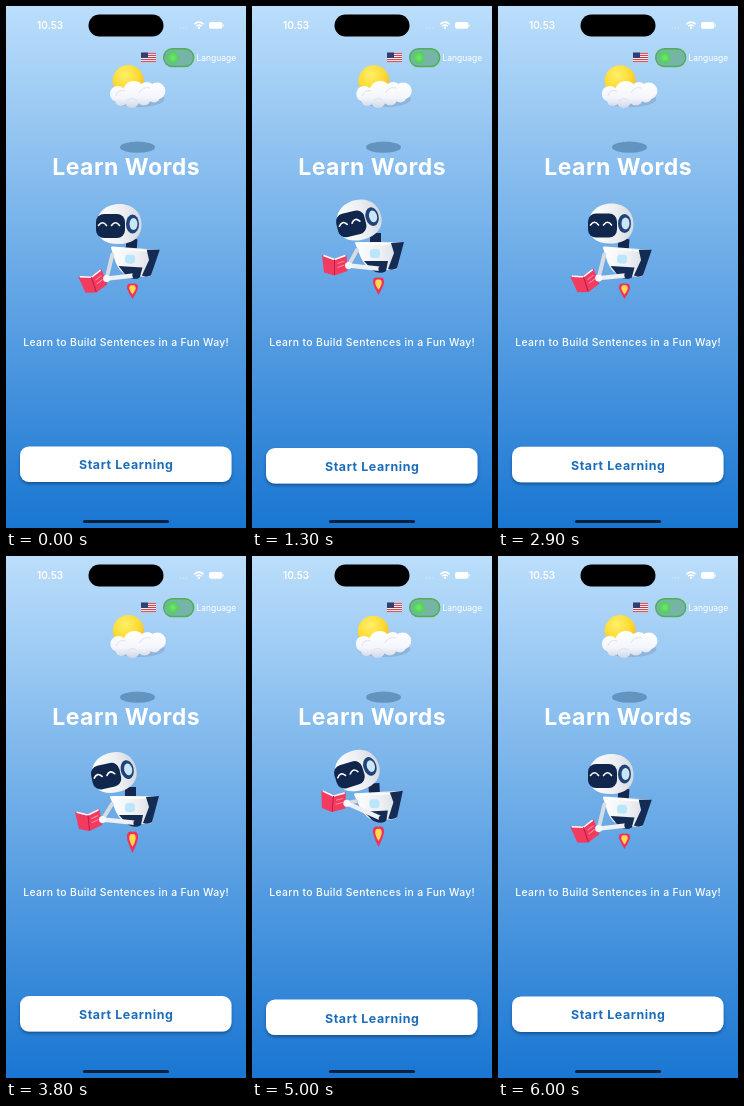
These frames come from a looping animation (240x522 px, 6100 ms). An HTML page:

```html
<!DOCTYPE html>
<html lang="en">
<head>
<meta charset="utf-8">
<title>Learn Words</title>
<style>
  html, body { margin: 0; width: 100%; height: 100%; overflow: hidden; }
  svg { display: block; width: 240px; height: 522px; font-family: Inter, "Open Sans", sans-serif; }
  .mid { text-anchor: middle; }
</style>
</head>
<body>
<svg viewBox="0 0 240 522">
  <defs>
    <linearGradient id="sky" x2="0" y2="1">
      <stop stop-color="#bbdefb"/><stop offset="1" stop-color="#1976d2"/>
    </linearGradient>
    <radialGradient id="sunFill" cx=".4" cy=".3" r=".7">
      <stop stop-color="#fff06a"/><stop offset=".6" stop-color="#ffdb35"/><stop offset="1" stop-color="#f6bd27"/>
    </radialGradient>
    <linearGradient id="puff" gradientUnits="userSpaceOnUse" x1="0" y1="76" x2="0" y2="102">
      <stop stop-color="#fff"/><stop offset=".6" stop-color="#f4f6fb"/><stop offset="1" stop-color="#cfd6e6"/>
    </linearGradient>
    <linearGradient id="shell">
      <stop stop-color="#fff"/><stop offset=".6" stop-color="#eceef1"/><stop offset="1" stop-color="#d3d8df"/>
    </linearGradient>
    <radialGradient id="knob">
      <stop stop-color="#72e86c"/><stop offset="1" stop-color="#4fce56"/>
    </radialGradient>
    <filter id="drop" x="-10%" y="-30%" width="120%" height="180%">
      <feDropShadow dx="0" dy="2" stdDeviation="1.6" flood-color="#06264f" flood-opacity=".5"/>
    </filter>
    <filter id="soft" x="-20%" y="-40%" width="140%" height="180%"><feGaussianBlur stdDeviation=".7"/></filter>
  </defs>

  <rect width="240" height="522" fill="url(#sky)"/>

  <!-- status bar -->
  <text x="31" y="23.2" font-size="10" font-weight="600" fill="#fff">10.53</text>
  <rect x="82.5" y="8.5" width="75" height="22" rx="11"/>
  <g fill="#fff" fill-opacity=".35">
    <circle cx="174.5" cy="22" r=".8"/><circle cx="177.5" cy="22" r=".8"/><circle cx="180.500" cy="22" r=".8"/>
  </g>
  <g fill="none" stroke="#fff" stroke-width="1.5">
    <path d="M188.300 18.300Q193 14 197.700 18.300M190.200 20.300Q193 17.800 195.800 20.300"/>
    <circle cx="193" cy="21.800" r=".5"/>
  </g>
  <rect x="203" y="16" width="13.500" height="6.800" rx="2" fill="#fff"/>
  <rect x="217" y="18.200" width="1" height="2.400" rx=".5" fill="#fff" opacity=".7"/>

  <!-- language switch -->
  <g id="flag">
    <rect x="135" y="46.500" width="15" height="10" fill="#f3f1f2"/>
    <path d="M135 47.300h15m-15 2.100h15m-15 2.100h15m-15 2.100h15m-15 2.100h15" stroke="#c13b4c" stroke-width="1"/>
    <rect x="135" y="46.500" width="7" height="5.400" fill="#2d3f73"/>
  </g>
  <rect x="157.700" y="42.700" width="30" height="17.800" rx="8.900" fill="#76b5a6" stroke="#4caf50" stroke-width="1.400"/>
  <circle cx="166.800" cy="51.600" r="5.800" fill="url(#knob)"/>
  <text x="190.500" y="54.600" font-size="8.500" fill="#fff">Language</text>

  <!-- weather -->
  <ellipse cx="131.500" cy="141.200" rx="17.500" ry="5.600" fill="#5c8db8" opacity=".85" filter="url(#soft)"/>
  <circle id="sun" cx="122.500" cy="74.500" r="15.500" fill="url(#sunFill)"/>
  <g id="cloud">
    <g fill="#7f9fc4" opacity=".5" transform="translate(.5 1)" filter="url(#soft)">
      <ellipse cx="132" cy="92" rx="26" ry="8"/>
    </g>
    <g fill="url(#puff)">
      <circle cx="112" cy="88" r="8"/><circle cx="128" cy="86" r="11"/>
      <circle cx="141" cy="85" r="9"/><circle cx="151" cy="85" r="8.500"/>
      <circle cx="115" cy="94" r="6"/><circle cx="126" cy="94.500" r="7.500"/>
      <circle cx="138" cy="92.500" r="7"/><circle cx="148" cy="90" r="6.500"/>
    </g>
    <path d="M110 90Q112 83 119 85M133 87Q137 80 144 82M121 95Q126 90 131 95" fill="none" stroke="#d9dfec" stroke-width=".9"/>
  </g>

  <text class="mid" x="120.200" y="169" font-size="23" font-weight="700" letter-spacing=".5" fill="#fff">Learn Words</text>

  <!-- robot -->
  <g id="flame">
    <path d="M0 1C-5-1-6.500 4-5 9Q-3.500 14 0 21Q3.500 14 5 9C6.500 4 5-1 0 1Z" fill="#f0315f"/>
    <path d="M0 3C-3 2-3.800 6-2.800 9Q-2 12 0 15Q2 12 2.800 9C3.800 6 3 2 0 3Z" fill="#ffd94e"/>
  </g>
  <g id="body">
    <path d="M-9-21H2V-11H-9Z" fill="#14284f"/>
    <path d="M-24-11Q-24-12-22-12H23L18 14Q17 16 14 16H-5Q-13 14-18 4Z" fill="url(#shell)"/>
    <path d="M12-11L25-12L18 14Q14 17 9 15L15-1Z" fill="#142b54"/>
    <path d="M-15 7H9L7 17Q0 21-7 16Z" fill="#142b54"/>
    <rect x="-9" y="-5" width="10" height="9" rx="3.500" fill="#b9e6fa"/>
    <path d="M-19-10H12" stroke="#fff" stroke-width="1.500"/>
  </g>
  <g id="head">
    <path d="M-22 2C-22-14-10-20 1-20C15-20 23-11 23 1C23 13 14 20 0 20C-14 20-22 14-22 2Z" fill="url(#shell)"/>
    <rect x="-22.500" y="-10" width="29" height="24" rx="8" fill="#11264c"/>
    <path d="M-20 1.500Q-16-4-12 1.500M-7 1.500Q-3-4 1 1.500" fill="none" stroke="#fff" stroke-width="1.600" stroke-linecap="round"/>
    <ellipse cx="14" cy="0" rx="6.500" ry="9.500" fill="#1f4279"/>
    <ellipse cx="15" cy="0" rx="4" ry="6" fill="#c9e5f6"/>
  </g>
  <g id="book" stroke-linejoin="round">
    <path d="M-12.500-9.500L0-6L12-9.500L13 6.500L0 11L-10.500 8Z" fill="#f33b60"/>
    <path d="M-11-9L0-5L11-9" fill="none" stroke="#fff" stroke-width="1.500"/>
    <path d="M0-5V10.500" stroke="#b91f48" stroke-width="1"/>
    <path d="M3-1L10-3.500M3 3L10 .5" stroke="#ff91a4" stroke-width="1"/>
  </g>
  <g fill="none" stroke-linecap="round" stroke-linejoin="round">
    <path id="arm" stroke="#d7dce3" stroke-width="4"/>
    <path id="forearm" stroke="#eef0f3" stroke-width="4.500"/>
  </g>
  <circle id="elbow" r="3.600" fill="#142b54"/>
  <circle id="hand" r="3.500" fill="#f8f9fb"/>

  <text class="mid" x="120.200" y="340.200" font-size="10.400" font-weight="500" letter-spacing=".35" fill="#fff">Learn to Build Sentences in a Fun Way!</text>

  <g id="button">
    <rect x="14" width="211.500" height="35.500" rx="9" fill="#fff" filter="url(#drop)"/>
    <text class="mid" x="120.200" y="23" font-size="12.400" font-weight="700" letter-spacing=".6" fill="#1c6db9">Start Learning</text>
  </g>

  <rect x="77" y="514" width="86" height="3" rx="1.500" fill="#0a203f"/>
</svg>
<script>
const LOOP = 6100, CYCLE = 3000, STEP = 100;

// time, head x y angle, body x y angle, book x y angle, flame top, flame length
const poses = [
  [0,    112.5, 218, 0,     128, 254, 4,     87, 276, -18,    277, 16],
  [800,  107.5, 216.5, -12, 128, 252, 0,     82.5, 264, -6,   275, 22],
  [1300, 106.5, 214, -14,   127, 248, 0,     82.5, 258.5, 0,  271, 18],
  [2000, 104.5, 214.5, -17, 126.5, 248, -3,  81, 245, 5,      270, 21],
  [2200, 104, 215.5, -17,   126, 250, -3,    80.5, 246.5, 5,  272, 21],
  [2900, 112.5, 217.5, 0,   128, 254, 4,     87, 275.5, -18,  277, 16]
];

const el = id => document.getElementById(id);
const move = (id, x, y, extra = "") => el(id).setAttribute("transform", `translate(${x} ${y}) ${extra}`);

// Cyclic access: the time column keeps growing past either end
function pose(i) {
  const n = poses.length, turn = Math.floor(i / n), p = poses[i - turn * n];
  return [p[0] + turn * CYCLE, ...p.slice(1)];
}

function poseAt(t) {
  let i = poses.length - 1;
  while (poses[i][0] > t) i--;
  const [a, b, c, d] = [-1, 0, 1, 2].map(k => pose(i + k));
  const span = c[0] - b[0], u = (t - b[0]) / span, s = u * u * (3 - 2 * u);
  return b.slice(1).map((v, j) => {
    const k = j + 1;
    const m0 = (c[k] - a[k]) / (c[0] - a[0]) * span;
    const m1 = (d[k] - b[k]) / (d[0] - b[0]) * span;
    return v + (c[k] - v) * s + u * (1 - u) * ((1 - u) * m0 - u * m1);
  });
}

// Point of a part's own space, on the stage
function place(x, y, angle, px, py) {
  const r = angle * Math.PI / 180, c = Math.cos(r), s = Math.sin(r);
  return [x + px * c - py * s, y + px * s + py * c];
}

function draw(time) {
  const t = Math.floor(time % LOOP / STEP) * STEP;
  const phase = t % CYCLE, wave = shift => Math.cos((phase - shift) / CYCLE * 2 * Math.PI);
  const [hx, hy, hr, bx, by, br, kx, ky, kr, fy, fl] = poseAt(phase);

  move("head", hx, hy, `rotate(${hr})`);
  move("body", bx, by, `rotate(${br})`);
  move("book", kx, ky, `rotate(${kr})`);
  move("flame", 126.5, fy, `scale(1 ${fl / 21})`);

  const shoulder = place(bx, by, br, -22, -4);
  const elbow = place(bx, by, br, 3, 15);
  const hand = place(kx, ky, kr, 14, 1);
  el("arm").setAttribute("d", `M${shoulder}L${hand}`);
  el("forearm").setAttribute("d", `M${elbow}L${hand}`);
  move("elbow", ...elbow);
  move("hand", ...hand);

  move("sun", .6 * wave(500) - .6, -.4 * wave(500) + .3);
  move("cloud", .4 * wave(900), 0);
  move("button", 0, 441.6 - 2 * wave(450));
}

const start = performance.now();
function tick() {
  draw(performance.now() - start);
  requestAnimationFrame(tick);
}
tick();
</script>
</body>
</html>
```
